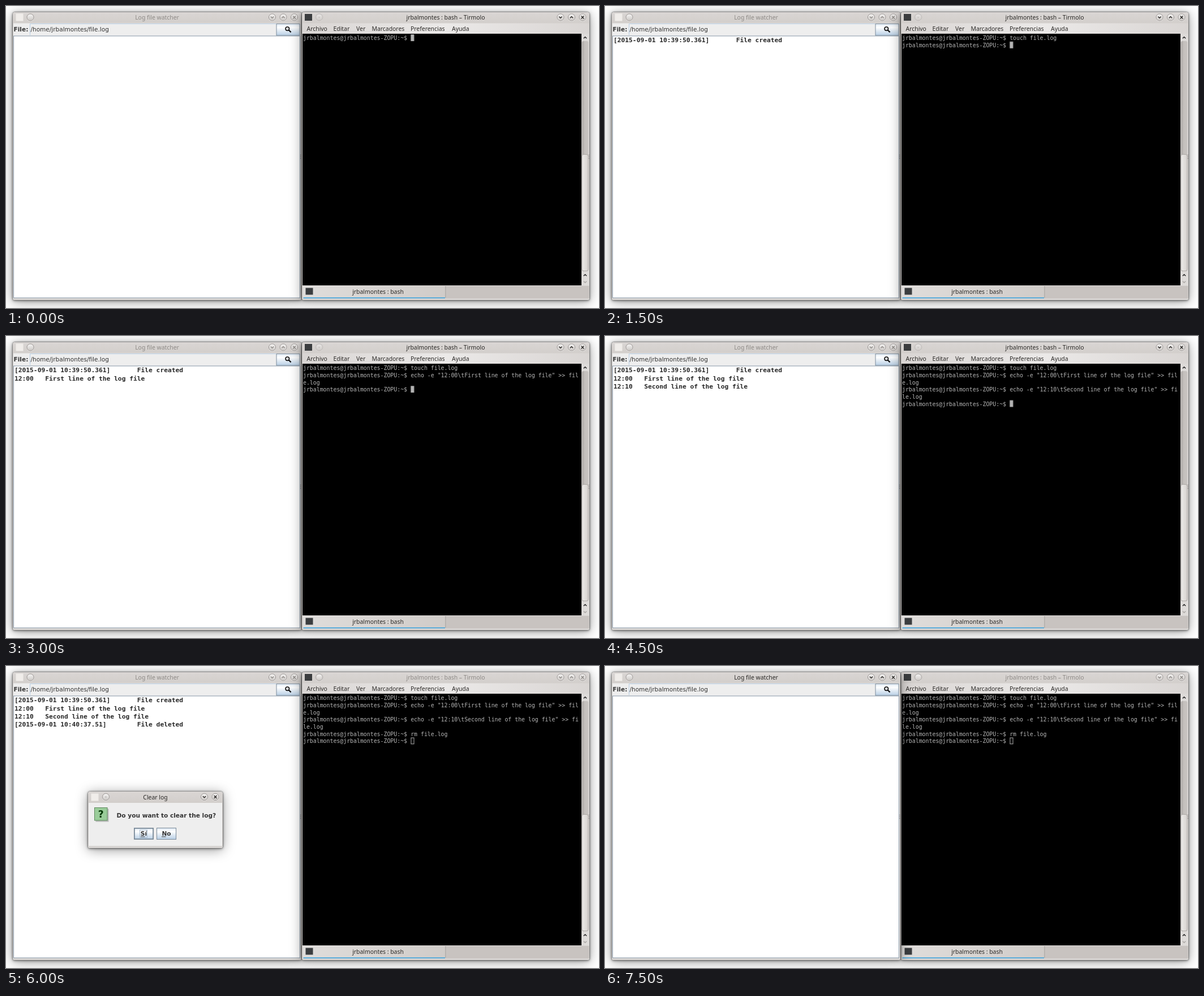
These frames come from a looping animation (1048 px wide and 534 px high, 9000 ms). An HTML page:

```html
<!DOCTYPE html>
<html lang="es">
<head>
<meta charset="utf-8">
<title>Log file watcher</title>
<style>
  html, body { margin: 0; width: 100%; height: 100%; overflow: hidden; background: #fff; }
  #stage { position: absolute; left: 0; top: 0; width: 1048px; height: 534px; overflow: hidden; background: #fff; }

  .win {
    position: absolute; border-radius: 4px 4px 3px 3px;
    background: linear-gradient(#dad6d4, #d2cecb 20px, #d8d5d3);
    box-shadow: 0 0 2px rgba(0,0,0,.85), 0 1px 5px rgba(0,0,0,.5), 0 3px 22px rgba(0,0,0,.4);
  }
  .win svg { position: absolute; left: 0; top: 0; width: 100%; height: 100%; }
  #watcher { left: 12px; top: 11px; width: 509.5px; height: 509px; z-index: 1; animation: raise 9s step-end infinite; }
  #shell { left: 522.5px; top: 11px; width: 508.5px; height: 509px; z-index: 2; }
  #dialog { left: 145px; top: 222px; width: 238px; height: 100px; z-index: 4; animation: ask 9s step-end infinite; }

  text { white-space: pre; font: 10.4px "Noto Sans", "Open Sans", sans-serif; fill: #2a2826; }
  .mid { text-anchor: middle; }
  .swing { font: 10.5px "DejaVu Sans", sans-serif; fill: #333; }
  .bold { font: bold 10.6px "DejaVu Sans", sans-serif; fill: #333; }
  .log { font: bold 11.26px "DejaVu Sans Mono", monospace; fill: #262626; }
  .term { font: 9.87px "DejaVu Sans Mono", monospace; fill: #b4b4b4; }
  .bar { color: #2a2826; }
  .bar text { fill: currentColor; }
  #watcher .bar { animation: focusLeft 9s step-end infinite; }
  #shell .bar { animation: blurRight 9s step-end infinite; }

  /* stages change every 1.5 s */
  .s1, .s2, .s3, .s4 { animation: 9s step-end infinite; }
  .s1 { animation-name: s1; }
  .s2 { animation-name: s2; }
  .s3 { animation-name: s3; }
  .s4 { animation-name: s4; }
  .entries { animation: clear 9s step-end infinite; }
  .cursor { animation: cursor 9s step-end infinite; }
  .before4 { animation: before4 9s step-end infinite; }

  @keyframes s1 { 0% { opacity: 0 } 16.666% { opacity: 1 } }
  @keyframes s2 { 0% { opacity: 0 } 33.333% { opacity: 1 } }
  @keyframes s3 { 0% { opacity: 0 } 50% { opacity: 1 } }
  @keyframes s4 { 0% { opacity: 0 } 66.666% { opacity: 1 } }
  @keyframes before4 { 0% { opacity: 1 } 66.666% { opacity: 0 } 100% { opacity: 0 } }
  @keyframes ask { 0% { opacity: 0 } 66.666% { opacity: 1 } 83.333% { opacity: 0 } 100% { opacity: 0 } }
  @keyframes clear { 0% { opacity: 1 } 83.333% { opacity: 0 } 100% { opacity: 0 } }
  @keyframes raise { 0% { z-index: 1 } 83.333% { z-index: 3 } 100% { z-index: 3 } }
  @keyframes focusLeft { 0% { color: #8e8a87 } 83.333% { color: #2a2826 } 100% { color: #2a2826 } }
  @keyframes blurRight { 0% { color: #2a2826 } 66.666% { color: #8e8a87 } 100% { color: #8e8a87 } }
  @keyframes cursor {
    0% { transform: translateY(0) }
    16.666% { transform: translateY(12.67px) }
    33.333% { transform: translateY(38px) }
    50% { transform: translateY(63.35px) }
    66.666% { transform: translateY(76px) }
    100% { transform: translateY(76px) }
  }
</style>
</head>
<body>
<div id="stage">
  <svg width="0" height="0" style="position:absolute">
    <defs>
      <linearGradient id="knob" x2="0" y2="1">
        <stop offset="0" stop-color="#f6f5f4"/><stop offset="1" stop-color="#cbc7c4"/>
      </linearGradient>
      <linearGradient id="metal" x2="0" y2="1">
        <stop offset="0" stop-color="#dde8f3"/><stop offset=".3" stop-color="#fff"/>
        <stop offset="1" stop-color="#b8cfe5"/>
      </linearGradient>
      <linearGradient id="menu">
        <stop offset="0" stop-color="#d9d5d3"/><stop offset=".5" stop-color="#ebe9e8"/>
        <stop offset="1" stop-color="#d9d5d3"/>
      </linearGradient>
      <linearGradient id="groove">
        <stop offset="0" stop-color="#aaa6a3"/><stop offset=".4" stop-color="#c3bfbc"/>
        <stop offset="1" stop-color="#c9c5c2"/>
      </linearGradient>
      <linearGradient id="thumb">
        <stop offset="0" stop-color="#eeecea"/><stop offset="1" stop-color="#d5d1ce"/>
      </linearGradient>
      <linearGradient id="tab">
        <stop offset="0" stop-color="#e0dddb"/><stop offset="1" stop-color="#d0ccc9"/>
      </linearGradient>
    </defs>
  </svg>
  <div class="win" id="watcher"></div>
  <div class="win" id="shell"></div>
  <div class="win" id="dialog"></div>
</div>
<script>
const USER = 'jrbalmontes';
const PROMPT = `${USER}@${USER}-ZOPU:~$ `;
const ROW = 12.67;
const COMMAND_X = 714.7;

const rect = (x, y, w, h, fill, more = '') =>
  `<rect x="${x}" y="${y}" width="${w}" height="${h}" fill="${fill}" ${more}/>`;
const text = (x, y, str, cls = '') =>
  `<text x="${x}" y="${y}" class="${cls}">${str.replace(/>/g, '&gt;')}</text>`;
const line = (d, color, width = 1) =>
  `<path d="${d}" fill="none" stroke="${color}" stroke-width="${width}"/>`;
const group = (cls, ...parts) => `<g class="${cls}">${parts.join('')}</g>`;
const chevron = (x, y, dir, color, s = 2.6) =>
  line(`M${x - s} ${y - dir * s / 2}l${s} ${dir * s}l${s} ${-dir * s}`, color, 1.5);

function knob(x, y, kind) {
  const face = `<circle cx="${x}" cy="${y + .6}" r="6.6" fill="#fff" opacity=".7"/>` +
    `<circle cx="${x}" cy="${y}" r="6.1" fill="url(#knob)" stroke="#918c89" stroke-width=".9"/>`;
  const marks = {
    down: () => chevron(x, y, 1, 'currentColor'),
    up: () => chevron(x, y, -1, 'currentColor'),
    close: () => line(`M${x - 2.4} ${y - 2.4}l4.8 4.8m0 -4.8l-4.8 4.8`, 'currentColor', 1.4),
    dot: () => `<circle cx="${x}" cy="${y}" r=".8" fill="#888"/>`
  };
  return face + (marks[kind] ? marks[kind]() : '');
}

const grip = x => [263, 266, 269].map(y => rect(x, y, 1.2, 1.2, '#8a8683')).join('');
const appIcon = (x, y) => rect(x - 6.5, y - 6.5, 13, 13, '#f0edea');

// Child coordinates are stage coordinates.
function fill(id, x, y, w, h, ...parts) {
  document.getElementById(id).innerHTML =
    `<svg viewBox="${x} ${y} ${w} ${h}">${parts.join('')}</svg>`;
}

const logLine = (n, cls, str) => text(15, 64.2 + n * 14.35, str, 'log ' + cls);
const termLine = (n, str, x = 524.5) => text(x, 60.3 + n * ROW, str, 'term');
const command = (n, str) => termLine(n, str, COMMAND_X);

fill('watcher', 12, 11, 509.5, 509,
  group('bar',
    appIcon(24, 20), knob(43, 20),
    text(267, 24.4, 'Log file watcher', 'mid'),
    knob(470.5, 20, 'down'), knob(490, 20, 'up'), knob(509.5, 20, 'close')),
  rect(13, 30.5, 507, 486, '#eee'),
  text(13.5, 45.4, 'File:', 'bold'),
  line('M42.5 51.5V31.5H477', '#b8cfe5'),
  text(43.5, 45.2, `/home/${USER}/file.log`, 'swing'),
  rect(478, 31.5, 41, 20.5, 'url(#metal)', 'stroke="#7a8a99"'),
  '<circle cx="497.3" cy="40.2" r="3.2" fill="none" stroke="#111" stroke-width="1.7"/>',
  line('M499.6 42.5l4 3.8', '#111', 2.3),
  rect(13.5, 53, 506, 463, '#fff', 'stroke="#8797a8"'),
  grip(520),
  group('entries',
    logLine(0, 's1', '[2015-09-01 10:39:50.361]       File created'),
    logLine(1, 's2', '12:00   First line of the log file'),
    logLine(2, 's3', '12:10   Second line of the log file'),
    logLine(3, 's4', '[2015-09-01 10:40:37.51]        File deleted'))
);

const menus = [[531, 'Archivo'], [578, 'Editar'], [618.5, 'Ver'],
  [646, 'Marcadores'], [714.5, 'Preferencias'], [787.5, 'Ayuda']];

fill('shell', 522.5, 11, 508.5, 509,
  group('bar',
    rect(527.5, 14, 13, 12, '#3b3d3f'),
    group('before4', `<g opacity=".55">${knob(553, 20, 'dot')}</g>`),
    group('s4', knob(553, 20)),
    text(776.5, 24.4, `${USER} : bash – Tirmolo`, 'mid'),
    knob(979.5, 20, 'down'), knob(999, 20, 'up'), knob(1018.5, 20, 'close')),
  rect(523.5, 30.5, 506.5, 18.5, 'url(#menu)'),
  ...menus.map(([x, name]) => text(x, 43.6, name)),
  rect(523.5, 49, 493, 445, '#000'),
  rect(1016.5, 49, 13.5, 445, '#dedbd9'),
  rect(1017.3, 62, 11.6, 407, 'url(#groove)', 'rx="3"'),
  rect(1017.6, 262.5, 11, 206, 'url(#thumb)', 'rx="3" stroke="#a39f9c" stroke-width=".8"'),
  chevron(1023, 56, -1, '#222'),
  chevron(1023, 476, -1, '#222'),
  chevron(1023, 488, 1, '#aaa6a3'),
  rect(776, 495, 254, 22, '#c8c3c0'),
  rect(524, 494.5, 252, 22.5, 'url(#tab)', 'rx="2"'),
  line('M776.3 495V516', '#a6a19e'),
  rect(525, 515.3, 250.5, 1.7, '#45a5dc'),
  rect(529, 498.5, 13, 12, '#3b3d3f'),
  text(657, 509.4, `${USER} : bash`, 'mid'),
  grip(1029),
  termLine(0, PROMPT),
  group('s1', command(0, 'touch file.log'), termLine(1, PROMPT)),
  group('s2',
    command(1, 'echo -e "12:00\\tFirst line of the log file" >> fil'),
    termLine(2, 'e.log'), termLine(3, PROMPT)),
  group('s3',
    command(3, 'echo -e "12:10\\tSecond line of the log file" >> fi'),
    termLine(4, 'le.log'), termLine(5, PROMPT)),
  group('s4', command(5, 'rm file.log'), termLine(6, PROMPT)),
  group('cursor',
    group('before4', rect(714.8, 50.3, 6, 11.8, '#b4b4b4')),
    group('s4', rect(715.4, 51, 5, 10.8, '#000', 'stroke="#b4b4b4"')))
);

const button = (x, label, mnemonic) =>
  rect(x + .5, 286.5, 34, 20, 'url(#metal)', 'stroke="#7a8a99"') +
  text(x + 17.5, 300.4, label, 'bold mid') +
  line(`M${mnemonic} 301.9h7.5`, '#333');

fill('dialog', 145, 222, 238, 100,
  group('bar',
    appIcon(157, 232), knob(176.5, 231.5, 'dot'),
    text(264, 236, 'Clear log', 'mid'),
    knob(350.5, 231.5, 'down'), knob(370, 231.5, 'close')),
  rect(146, 242, 236, 76, '#eee'),
  rect(158.5, 252.5, 23, 23, '#bbb'),
  rect(156.5, 250.5, 22.5, 22.5, '#9c9', 'stroke="#5f8a5f"'),
  '<text x="167.8" y="267.8" class="bold mid" style="font-size:17px;fill:#030">?</text>',
  text(195.5, 268.4, 'Do you want to clear the log?', 'bold'),
  button(226, 'Sí', 238), button(266, 'No', 275),
  rect(227.3, 287.3, 32.4, 18.4, 'none', 'stroke="#7a8a99"'),
  rect(236.5, 290, 13, 13.5, 'none', 'stroke="#a3b8cc" stroke-width=".9"')
);
</script>
</body>
</html>
```
